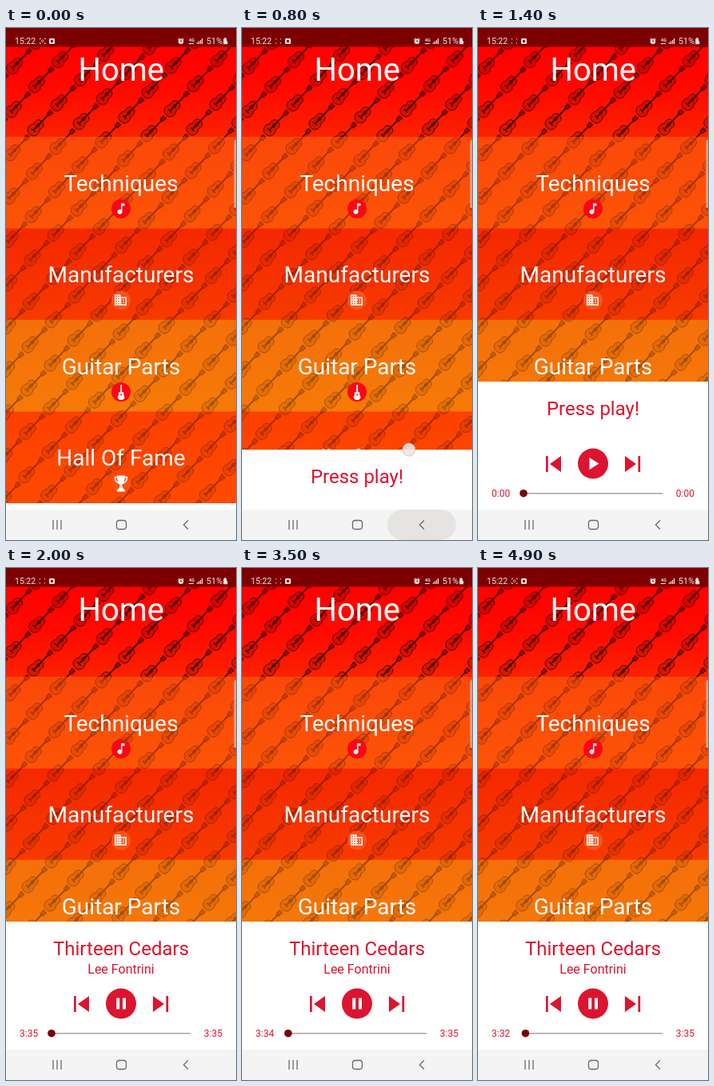
Animation of 288x640 px, one loop 5000 ms. Source, as an HTML page:

```html
<!DOCTYPE html>
<html lang="en">
<head>
<meta charset="utf-8">
<title>Guitar app player</title>
<style>
  html, body { margin: 0; width: 100%; height: 100%; overflow: hidden; background: #fff; }
  svg { display: block; width: 100%; height: 100%; font-family: Roboto, sans-serif; }
  .mid { text-anchor: middle; }
  .band { font-size: 28px; fill: #fff; }
  .red { fill: #dc142f; }
</style>
</head>
<body>
<svg viewBox="0 0 288 640">
  <defs>
    <linearGradient id="head" x2="0" y2="1"><stop stop-color="#ff0000"/><stop offset=".5" stop-color="#ff0a00"/><stop offset="1" stop-color="#fb2200"/></linearGradient>
    <linearGradient id="b0" x2="0" y2="1"><stop stop-color="#fb4809"/><stop offset="1" stop-color="#fc5407"/></linearGradient>
    <linearGradient id="b1" x2="0" y2="1"><stop stop-color="#f52800"/><stop offset="1" stop-color="#f73a00"/></linearGradient>
    <linearGradient id="b2" x2="0" y2="1"><stop stop-color="#f4700a"/><stop offset="1" stop-color="#f67a08"/></linearGradient>
    <linearGradient id="b3" x2="0" y2="1"><stop stop-color="#fc4000"/><stop offset="1" stop-color="#ff4a00"/></linearGradient>
    <mask id="fade" maskUnits="userSpaceOnUse" x="0" y="0" width="288" height="640">
      <rect width="288" height="136" fill="#b8b8b8"/>
      <rect y="136" width="288" height="504" fill="#585858"/>
    </mask>
    <g id="guitar" stroke="#000" stroke-width=".9" stroke-linejoin="round">
      <path d="M-20 0C-20-8-11-9-7-5C-4-7 2-6 2-1V1C2 6-4 7-7 5C-11 9-20 8-20 0Z" fill="#000" fill-opacity=".22"/>
      <circle cx="-5" r="2" fill="#000" fill-opacity=".5"/>
      <path d="M-13-3V3" stroke-width="1.500"/>
      <path d="M-12 0H14" stroke-width="2"/>
      <path d="M13-1.600L20-2.600V2.600L13 1.600Z" fill="#000" fill-opacity=".5"/>
      <path d="M15-3.400V3.400M18-3.600V3.600" stroke-width=".8"/>
    </g>
  </defs>

  <rect y="22" width="288" height="115" fill="url(#head)"/>
  <g id="bands"></g>
  <g id="pattern" mask="url(#fade)"></g>
  <text class="mid" x="144.200" y="66" font-size="40" fill="#fff">Home</text>
  <g id="labels" class="mid band"></g>

  <circle cx="144" cy="226" r="12" fill="#fb0713"/>
  <path transform="translate(135 217) scale(.75)" fill="#fff" d="M12 3v10.55c-.59-.34-1.27-.55-2-.55-2.21 0-4 1.79-4 4s1.79 4 4 4 4-1.79 4-4V7h4V3h-6z"/>
  <circle cx="144" cy="340.500" r="12" fill="#fc5118"/>
  <path transform="translate(134.500 331) scale(.75)" fill="#fff" d="M12 7V3H2v18h20V7H12zM6 19H4v-2h2v2zm0-4H4v-2h2v2zm0-4H4V9h2v2zm0-4H4V5h2v2zm4 12H8v-2h2v2zm0-4H8v-2h2v2zm0-4H8V9h2v2zm0-4H8V5h2v2zm10 12h-8v-2h2v-2h-2v-2h2v-2h-2V9h8v10zm-2-8h-2v2h2v-2zm0 4h-2v2h2v-2z"/>
  <circle cx="144" cy="455" r="12" fill="#fb0713"/>
  <path fill="#fff" d="M143.300 446h1.800v9c2.600-.4 2.900 2 2 3.600c2.800 3 1.300 6.400-2.900 6.400s-5.700-3.400-2.900-6.400c-.9-1.600-.6-4 2-3.600z"/>
  <circle cx="144.300" cy="458.500" r="1.100" fill="#fb0713"/>
  <circle cx="144" cy="569" r="12" fill="#fd5014"/>
  <path d="M139.500 561.500H136.500C136.500 565 138 568 141.500 569M148.500 561.500H151.500C151.500 565 150 568 146.500 569" fill="none" stroke="#fff" stroke-width="1.500"/>
  <path d="M139 559.500h10c0 6-1.500 9-3.500 11.500c0 3.500 1 5 3.500 6.500v2h-10v-2c2.500-1.500 3.500-3 3.500-6.500c-2-2.500-3.500-5.500-3.500-11.500z" fill="#fff"/>
  <rect x="285.500" y="140" width="4" height="85" rx="2" fill="#dccfc8" opacity=".65"/>

  <g id="sheet">
    <rect width="288" height="210" fill="#fff"/>
    <text id="title" class="mid red" x="144" y="42" font-size="24"></text>
    <text id="artist" class="mid red" x="144" y="65" font-size="16"></text>
    <g class="red">
      <path d="M85 93h2.700v20H85zM104 93v20L90 103zM184 93v20L198 103zM200.500 93h2.700v20h-2.700z"/>
      <circle cx="144" cy="102.500" r="19"/>
    </g>
    <path id="play" fill="#fff" d="M139.500 95v15L151.500 102.500z"/>
    <path id="pause" fill="#fff" d="M138.200 95.500h4v14h-4zM146 95.500h4v14h-4z"/>
    <path d="M57 139.700H231" stroke="#a3a3a3" stroke-width="1.500"/>
    <circle id="knob" cy="139.700" r="4.800" fill="#780006"/>
    <g class="red" font-size="12">
      <text id="left" x="17" y="144"></text>
      <text id="total" x="271" y="144" text-anchor="end"></text>
    </g>
  </g>

  <rect y="602" width="288" height="38" fill="#f4f4f4"/>
  <rect id="press" x="182" y="602" width="86" height="38" rx="19" fill="#e6e4e1"/>
  <g fill="none" stroke="#6a6a6a" stroke-width="1.300">
    <path d="M59 615V627M64 615V627M69 615V627"/>
    <rect x="138.500" y="615.500" width="12" height="11" rx="3.200"/>
    <path d="M228 615.500L222.500 621L228 626.500"/>
  </g>
  <circle id="touch" r="8" fill="#f1e6e2" fill-opacity=".9" stroke="#c9b9b4" stroke-width=".8"/>

  <rect width="288" height="23.500" fill="#7c0000"/>
  <g fill="#f6e4e4">
    <text x="11" y="20" font-size="10.500">15:22</text>
    <text x="251" y="20" font-size="10.800">51%</text>
    <text x="229" y="17" font-size="5.500" font-weight="bold">4G</text>
    <path d="M229 19h6v1h-6zM239 18h1.200v2H239zM241 16.500h1.200V20H241zM243 15h1.200v5H243zM245 13h1.200v7H245z"/>
    <rect x="54" y="13" width="7" height="7" rx="1.300"/>
    <circle cx="57.500" cy="16.500" r="1.700" fill="#7c0000"/>
    <path d="M273.300 12.300h2v1h1v3h1v4h-5v-7h1z"/>
    <circle cx="219" cy="16.800" r="3.300"/>
    <path d="M215.500 14.500l2-2M222.500 14.500l-2-2" stroke="#f6e4e4"/>
    <path d="M219 15v2h1.700" fill="none" stroke="#7c0000" stroke-width=".9"/>
  </g>
  <g fill="none" stroke="#e9c9c9" stroke-width=".9">
    <path id="dots" d="M42.500 13v1.500M42.500 18v1.500M48.500 13v1.500M48.500 18v1.500"/>
    <g id="frame">
      <path d="M44 13H42.500V14.500M42.500 18V19.500H44M47.500 13H49V14.500M49 18V19.500H47.500"/>
      <circle cx="45.700" cy="16.300" r="1.300"/>
    </g>
  </g>
</svg>
<script>
const LOOP = 5000, TICK = 100, SONG = 215, PLAY_AT = 1800;
const CLOSED = 594, OPEN = 442;
const $ = id => document.getElementById(id);
const clamp = v => Math.min(1, Math.max(0, v));
const smooth = v => v * v * (3 - 2 * v);
const show = (id, on) => $(id).setAttribute('visibility', on ? 'visible' : 'hidden');
const clock = s => Math.floor(s / 60) + ':' + String(s % 60).padStart(2, '0');

function build() {
  const step = 114.4;
  let bands = '', labels = '', guitars = '';
  ['Techniques', 'Manufacturers', 'Guitar Parts', 'Hall Of Fame'].forEach((name, i) => {
    const y = 136 + i * step;
    bands += `<rect y="${y}" width="288" height="${step + .5}" fill="url(#b${i})"/>`;
    labels += `<text x="144" y="${y + 68}">${name}</text>`;
  });
  // Slightly tilted grid of guitars, every other row shifted by half a cell
  for (let row = -2; row < 28; row++) {
    for (let col = -2; col < 7; col++) {
      const c = col + (row % 2 ? .5 : 0);
      const x = 17 + c * 57 - row * .7, y = 41 - c * 8 + row * 27.1;
      guitars += `<use href="#guitar" transform="translate(${x} ${y}) rotate(-46)"/>`;
    }
  }
  $('bands').innerHTML = bands;
  $('labels').innerHTML = labels;
  $('pattern').innerHTML = guitars;
}

function draw(t) {
  const top = CLOSED + (OPEN - CLOSED) * smooth(clamp((t - 340) / 1000));
  $('sheet').setAttribute('transform', `translate(0 ${top})`);

  const drag = clamp((t - 400) / 600);
  $('touch').setAttribute('cx', 222 - 19.5 * drag);
  $('touch').setAttribute('cy', top);
  show('touch', t >= 400 && t < 1100);
  $('press').setAttribute('opacity', clamp((t - 300) / 300) * clamp((1200 - t) / 300));

  const playing = t >= PLAY_AT + 100;
  const secs = playing ? Math.floor((t - PLAY_AT) / 1000) : 0;
  $('title').textContent = playing ? 'Thirteen Cedars' : 'Press play!';
  $('artist').textContent = playing ? 'Lee Fontrini' : '';
  $('left').textContent = clock(playing ? SONG - secs : 0);
  $('total').textContent = clock(playing ? SONG : 0);
  $('knob').setAttribute('cx', 57 + 174 * secs / SONG);
  show('play', !playing);
  show('pause', playing);

  const framed = t < 400 || t >= 3800;
  show('frame', framed);
  show('dots', !framed);
}

build();
const start = performance.now();
function loop() {
  const t = (performance.now() - start) % LOOP;
  draw(Math.floor(t / TICK) * TICK);
  requestAnimationFrame(loop);
}
loop();
</script>
</body>
</html>
```
